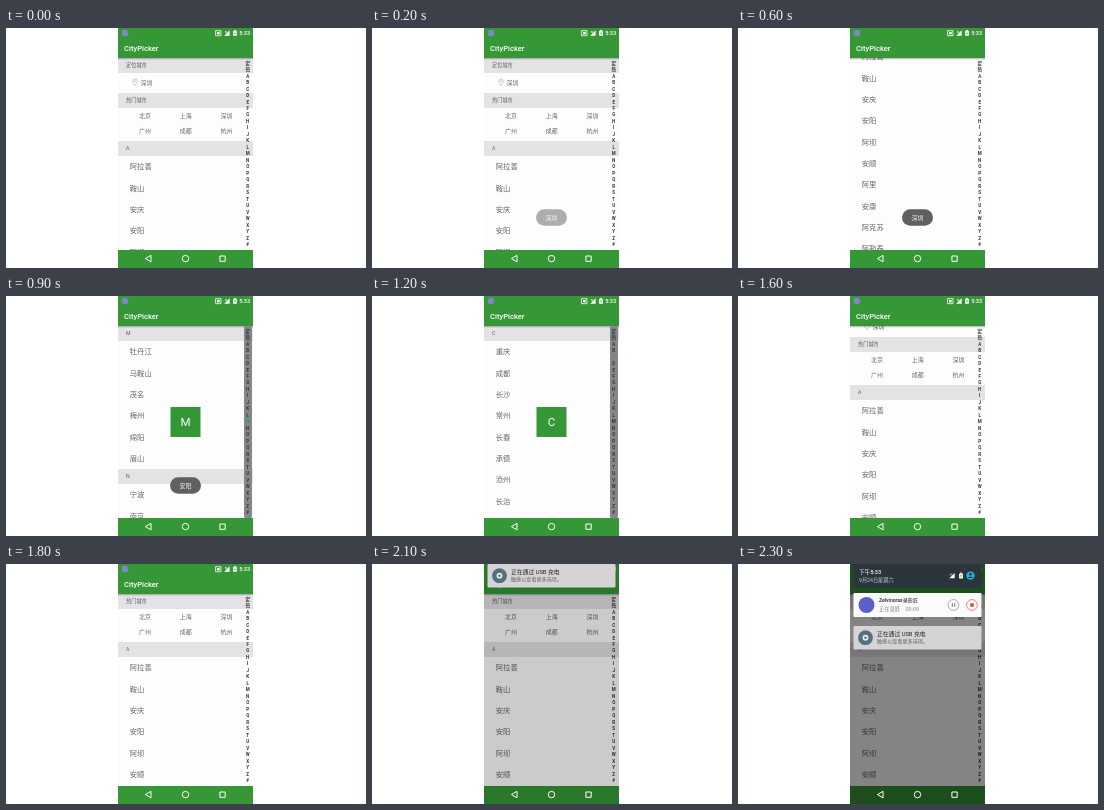
An HTML page for the animation above (2.4 s loop, 360 by 240 pixels).

```html
<!DOCTYPE html>
<html lang="zh-CN">
<head>
<meta charset="utf-8">
<title>CityPicker</title>
<style>
html, body { margin: 0; width: 100%; height: 100%; overflow: hidden; background: #fff; }
svg { display: block; width: 360px; height: 240px; }
text { font-family: Roboto, "Noto Sans CJK SC", "Noto Sans CJK", sans-serif; }
</style>
</head>
<body>
<svg id="stage" viewBox="0 0 360 240" lang="zh-CN">
  <defs>
    <clipPath id="phone"><rect x="112" width="135" height="240"/></clipPath>
    <clipPath id="view"><rect x="112" y="30" width="135" height="192"/></clipPath>
    <linearGradient id="shadow" x2="0" y2="1">
      <stop stop-color="#000" stop-opacity=".3"/><stop offset="1" stop-color="#000" stop-opacity="0"/>
    </linearGradient>
  </defs>
  <g clip-path="url(#phone)">
    <rect x="112" width="135" height="240" fill="#fdfdfd"/>
    <g clip-path="url(#view)"><g id="list"></g></g>
    <rect x="112" y="30" width="135" height="2" fill="url(#shadow)"/>
    <g id="index"></g>
    <g id="bars"></g>
    <g id="letter"></g>
    <g id="toast"></g>
    <rect id="dim" x="112" width="135" height="240" fill="#000" opacity="0"/>
    <g id="nav"></g>
    <g id="shade"></g>
  </g>
</svg>
<script>
const GREEN = '#359735', GREY = '#e4e2e5', INK = '#666';
const TOP = 30, BAND = 15, ROW = 21.33;
const $ = id => document.getElementById(id);

function add(parent, tag, attrs, content) {
  const node = document.createElementNS('http://www.w3.org/2000/svg', tag);
  for (const key in attrs) node.setAttribute(key, attrs[key]);
  if (content) node.textContent = content;
  parent.appendChild(node);
  return node;
}
// Text placed by its vertical middle.
const label = (parent, s, x, y, size, fill, extra) =>
  add(parent, 'text', { x, y: y + size * 0.36, 'font-size': size, fill, ...extra }, s);
const rect = (parent, x, y, width, height, fill, extra) =>
  add(parent, 'rect', { x, y, width, height, fill, ...extra });
const circle = (parent, cx, cy, r, fill, extra) =>
  add(parent, 'circle', { cx, cy, r, fill, ...extra });
const path = (parent, d, fill, extra) => add(parent, 'path', { d, fill, ...extra });
const MID = { 'text-anchor': 'middle' };

const cities = {
  A: '阿拉善 鞍山 安庆 安阳 阿坝 安顺 阿里 安康 阿克苏 阿勒泰',
  C: '重庆 成都 长沙 常州 长春 承德 沧州 长治 常德',
  H: '杭州 合肥 哈尔滨 海口 惠州 邯郸 湖州 衡阳 淮安',
  J: '济南 嘉兴 金华 江门 九江 吉林 济宁 荆州 焦作',
  M: '牡丹江 马鞍山 茂名 梅州 绵阳 眉山',
  N: '宁波 南京 南昌 南宁 南通 南充',
  S: '上海 深圳 苏州 沈阳 石家庄 三亚 绍兴 汕头 商丘'
};
const starts = {};

function buildList() {
  const list = $('list');
  const band = (s, y) => {
    rect(list, 112, y, 135, BAND, GREY);
    label(list, s, 120, y + 7.6, 5.2, '#606060');
  };
  band('定位城市', TOP);
  path(list, 'M129 57.6C127.6 55.6 126.7 54.5 126.7 53.3A2.3 2.3 0 0 1 131.3 53.3C131.3 54.5 130.4 55.6 129 57.6Z',
    'none', { stroke: '#aaa', 'stroke-width': 0.6 });
  circle(list, 129, 53.3, 0.7, '#aaa');
  label(list, '深圳', 134.5, 54.7, 6, INK);
  band('热门城市', 65);
  ['北京', '上海', '深圳', '广州', '成都', '杭州'].forEach((s, i) =>
    label(list, s, 139 + i % 3 * 40.7, 87.6 + (i > 2 ? 15 : 0), 6, INK, MID));
  let y = 113;
  for (const key in cities) {
    starts[key] = y - TOP;
    band(key, y);
    y += BAND;
    for (const s of cities[key].split(' ')) {
      label(list, s, 123.7, y + ROW / 2, 7.35, INK);
      y += ROW;
    }
  }
}

function signal(parent, x, y) {
  path(parent, `M${x + 2.6} ${y - 2.7}V${y + 2.7}H${x - 2.8}Z`, '#fff');
  path(parent, `M${x - 2} ${y - 2}L${x - 0.2} ${y - 0.2}M${x - 0.2} ${y - 2}L${x - 2} ${y - 0.2}`, 'none',
    { stroke: '#fff', 'stroke-width': 0.6 });
}
function battery(parent, x, y) {
  rect(parent, x - 1.9, y - 2.2, 3.8, 5, '#fff', { rx: 0.5 });
  rect(parent, x - 0.9, y - 3, 1.8, 1, '#fff');
  path(parent, `M${x + 0.3} ${y - 1.5}L${x - 1} ${y + 0.6}H${x}L${x - 0.3} ${y + 2}L${x + 1} ${y}H${x}Z`, GREEN);
}

function buildBars() {
  const bars = $('bars');
  rect(bars, 112, 0, 135, 30, GREEN);
  circle(bars, 119, 5, 3.3, '#8084c8');
  path(bars, 'M209.6 2.7H215V7.7H209.6Z', 'none', { stroke: '#fff', 'stroke-width': 0.8 });
  rect(bars, 211, 4, 2.7, 2.4, '#fff');
  signal(bars, 221, 5);
  battery(bars, 229, 5);
  label(bars, '5:33', 233.2, 5.2, 5.6, '#fff', { 'font-weight': 500 });
  label(bars, 'CityPicker', 118, 20, 7.6, '#fff', { 'font-weight': 500 });
  rect(bars, 112, 222, 135, 18, GREEN);

  const line = { stroke: '#fff', 'stroke-width': 1, 'stroke-linejoin': 'round' };
  path($('nav'), 'M145 227.3V233.9L139.4 230.6Z', 'none', line);
  circle($('nav'), 179.5, 230.6, 3.2, 'none', line);
  rect($('nav'), 213.9, 228, 5.3, 5.3, 'none', line);
}

const marks = {};
let indexBack;
function buildIndex() {
  indexBack = rect($('index'), 238, 30, 8, 192, '#88868a', { rx: 1.5 });
  [...'定热ABCDEFGHIJKLMNOPQRSTUVWXYZ#'].forEach((s, i) => {
    marks[s] = label($('index'), s, 241.7, 35 + i * 6.48, 4.5, '#333', { ...MID, 'font-weight': 700 });
  });
}

function buildShade() {
  const g = $('shade');
  rect(g, 115, -40, 128.5, 64, '#2a363b');
  label(g, '下午5:33', 121, 8.2, 5.6, '#fff', { 'font-weight': 500 });
  label(g, '9月24日星期六', 121, 16, 5.2, '#c3cbce');
  signal(g, 214, 11.6);
  battery(g, 223, 11.6);
  circle(g, 232.5, 11.6, 4.2, '#27b3d0');
  circle(g, 232.5, 10.3, 1.3, '#2a363b');
  path(g, 'M229.9 14.1A2.8 2.2 0 0 1 235.1 14.1Z', '#2a363b');

  rect(g, 115.5, 29, 128, 24, '#fbfbfb', { rx: 1 });
  circle(g, 128.5, 41, 8, '#5a60c8');
  label(g, 'Zelvinoras录影匠', 141, 36.6, 5.1, '#222', { 'font-weight': 500 });
  label(g, '正在录屏', 141, 45.5, 5.2, '#888');
  label(g, '00:09', 167.5, 45.5, 5.5, '#888');
  const ring = { 'stroke-width': 0.7 };
  circle(g, 215.5, 41, 5.4, 'none', { ...ring, stroke: '#888' });
  rect(g, 213.8, 39.1, 1, 3.8, '#777');
  rect(g, 216.2, 39.1, 1, 3.8, '#777');
  circle(g, 234, 41, 5.4, 'none', { ...ring, stroke: '#e2574c' });
  rect(g, 232.3, 39.3, 3.4, 3.4, '#e2402f');

  rect(g, 115.5, 62, 128, 23.5, '#d5d3d6', { rx: 1 });
  circle(g, 127.5, 73.7, 7.4, '#53707c');
  circle(g, 127.5, 73.7, 2.9, '#e8ecee');
  circle(g, 127.5, 73.7, 1.2, '#53707c');
  label(g, '正在通过 USB 充电', 139, 69.9, 5.8, '#222');
  label(g, '触摸以查看更多选项。', 139, 77.6, 5.1, '#666');
}

buildList();
buildIndex();
buildBars();
buildShade();

rect($('letter'), 164.5, 111, 30, 30, GREEN);
const bigLetter = label($('letter'), 'A', 179.5, 126.2, 11.5, '#fff', MID);
rect($('toast'), 164, 181.3, 31, 16.4, '#606060', { rx: 8.2 });
const toastText = label($('toast'), '深圳', 179.5, 189.5, 6, '#f4f4f4', MID);

// Start, scroll or touched letter, toast, toast opacity, shade offset, dimming
const steps = [
  [0, 0],
  [200, 0, '深圳', 0.5],
  [300, 0, '深圳', 1],
  [400, 28, '深圳', 1],
  [500, 70, '深圳', 1],
  [600, 110, '深圳', 1],
  [700, 110, '安阳', 1],
  [800, 'H', '安阳', 1],
  [900, 'M', '安阳', 1],
  [1000, 'S', '安阳', 0.6],
  [1100, 'J'],
  [1200, 'C'],
  [1300, 'A'],
  [1400, 0],
  [1500, 10],
  [1600, 24],
  [1700, 32],
  [1800, 35],
  [2100, 35, '', 0, -62, 0.2],
  [2200, 35, '', 0, -22, 0.38],
  [2300, 35, '', 0, 0, 0.48]
];

function show([, place, toast = '', alpha = 0, drop = -100, dim = 0]) {
  const touched = typeof place === 'string';
  $('list').setAttribute('transform', `translate(0 ${-(touched ? starts[place] : place)})`);
  indexBack.setAttribute('opacity', touched ? 1 : 0);
  for (const key in marks) marks[key].setAttribute('fill', touched && key === place ? '#2fa52f' : '#333');
  $('letter').setAttribute('opacity', touched ? 1 : 0);
  if (touched) bigLetter.textContent = place;
  $('toast').setAttribute('opacity', alpha);
  toastText.textContent = toast;
  $('shade').setAttribute('transform', `translate(0 ${drop})`);
  $('dim').setAttribute('opacity', dim);
}

const begin = performance.now();
let current;
function tick() {
  const t = (performance.now() - begin) % 2400;
  const step = steps.filter(s => s[0] <= t).pop();
  if (step !== current) show(current = step);
  requestAnimationFrame(tick);
}
tick();
</script>
</body>
</html>
```
